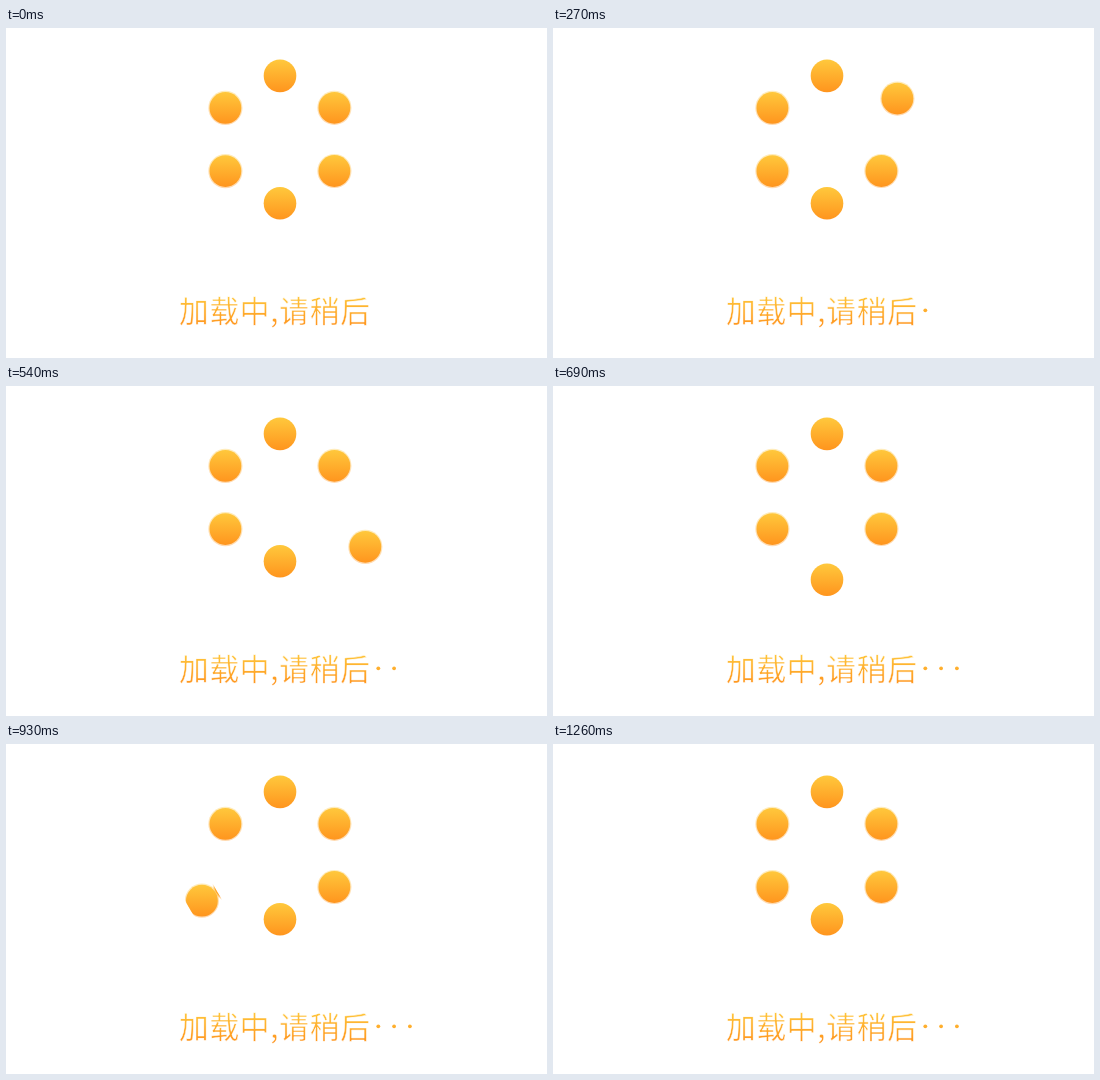
Animation of 541 by 330 pixels, one loop 1.32 s. Source, as an HTML page with a canvas:

```html
<!DOCTYPE html>
<html lang="zh">
<head>
<meta charset="utf-8">
<style>
  html, body { margin: 0; width: 100%; height: 100%; overflow: hidden; background: #fff; }
  canvas { display: block; }
</style>
</head>
<body>
<canvas id="stage" width="541" height="330"></canvas>
<script>
const ctx = document.getElementById('stage').getContext('2d');
const LOOP = 1320, STEP = 30, STEPS_PER_BALL = 7, PEAK = 4, REACH = 35.7, LEAD = 0.15;
const RADIUS = 16, CUT = 14.6, WRAP = 32.3;

// Clockwise from the top
const balls = [[274, 47.9], [328.4, 79.8], [328.4, 143], [274, 175.3], [219.4, 143.1], [219.4, 79.9]];

function gradient(top, bottom) {
  const g = ctx.createLinearGradient(0, top, 0, bottom);
  g.addColorStop(0, '#ffc83c');
  g.addColorStop(1, '#ff951e');
  return g;
}

function disc(x, y, r) {
  ctx.beginPath();
  ctx.arc(x, y, r, 0, Math.PI * 2);
  ctx.fill();
}

function drawBall(x, y, soft) {
  ctx.fillStyle = gradient(y - RADIUS, y + RADIUS);
  if (soft) {
    ctx.globalAlpha = 0.35;
    disc(x, y, RADIUS + 1.1);
    ctx.globalAlpha = 1;
  }
  disc(x, y, RADIUS + (soft ? -0.1 : 0.3));
}

// Draws the part of a ball lying between two distances along its direction
function drawSlice(x, y, angle, from, to) {
  ctx.save();
  ctx.translate(x, y);
  ctx.rotate(angle);
  ctx.beginPath();
  ctx.rect(from, -20, to - from, 40);
  ctx.clip();
  ctx.rotate(-angle);
  drawBall(0, 0, true);
  ctx.restore();
}

// Linear out in four steps, back in three
function offset(step) {
  if (step <= 0 || step >= STEPS_PER_BALL) return 0;
  return REACH * (step <= PEAK
    ? (step + LEAD) / (PEAK + LEAD)
    : (STEPS_PER_BALL - step) / (STEPS_PER_BALL - PEAK));
}

function drawText() {
  ctx.font = '300 29.7px "Noto Sans CJK SC", "Noto Sans CJK", sans-serif';
  ctx.letterSpacing = '0.75px';
  const line = ['加载中,请稍后', 173, 293.8];
  ctx.fillText(...line);
  // A white outline thins the strokes
  ctx.strokeStyle = '#fff';
  ctx.lineWidth = 0.5;
  ctx.lineJoin = 'round';
  ctx.strokeText(...line);
}

function draw(now) {
  const frame = Math.floor(now % LOOP / STEP);
  ctx.fillStyle = '#fff';
  ctx.fillRect(0, 0, 541, 330);

  balls.forEach(([x, y], i) => {
    const angle = (i * 60 - 90) * Math.PI / 180;
    const distance = offset(frame - i * STEPS_PER_BALL);
    const cos = Math.cos(angle), sin = Math.sin(angle);
    const bx = x + distance * cos, by = y + distance * sin;
    // The left balls lose their outer edge, which wraps to the inner side
    if (distance && i > 3) {
      drawSlice(bx - WRAP * cos, by - WRAP * sin, angle, CUT, 20);
      drawSlice(bx, by, angle, -20, CUT);
    } else {
      drawBall(bx, by, i % 3 !== 0);
    }
  });

  ctx.fillStyle = gradient(267, 298);
  drawText();
  const dots = Math.min(3, Math.floor((frame - 1) / STEPS_PER_BALL));
  for (let i = 0; i < dots; i++) disc(372.3 + i * 15.8, 282.3, 1.9);

  requestAnimationFrame(tick);
}

const start = performance.now();
function tick() { draw(performance.now() - start); }
tick();
</script>
</body>
</html>
```
